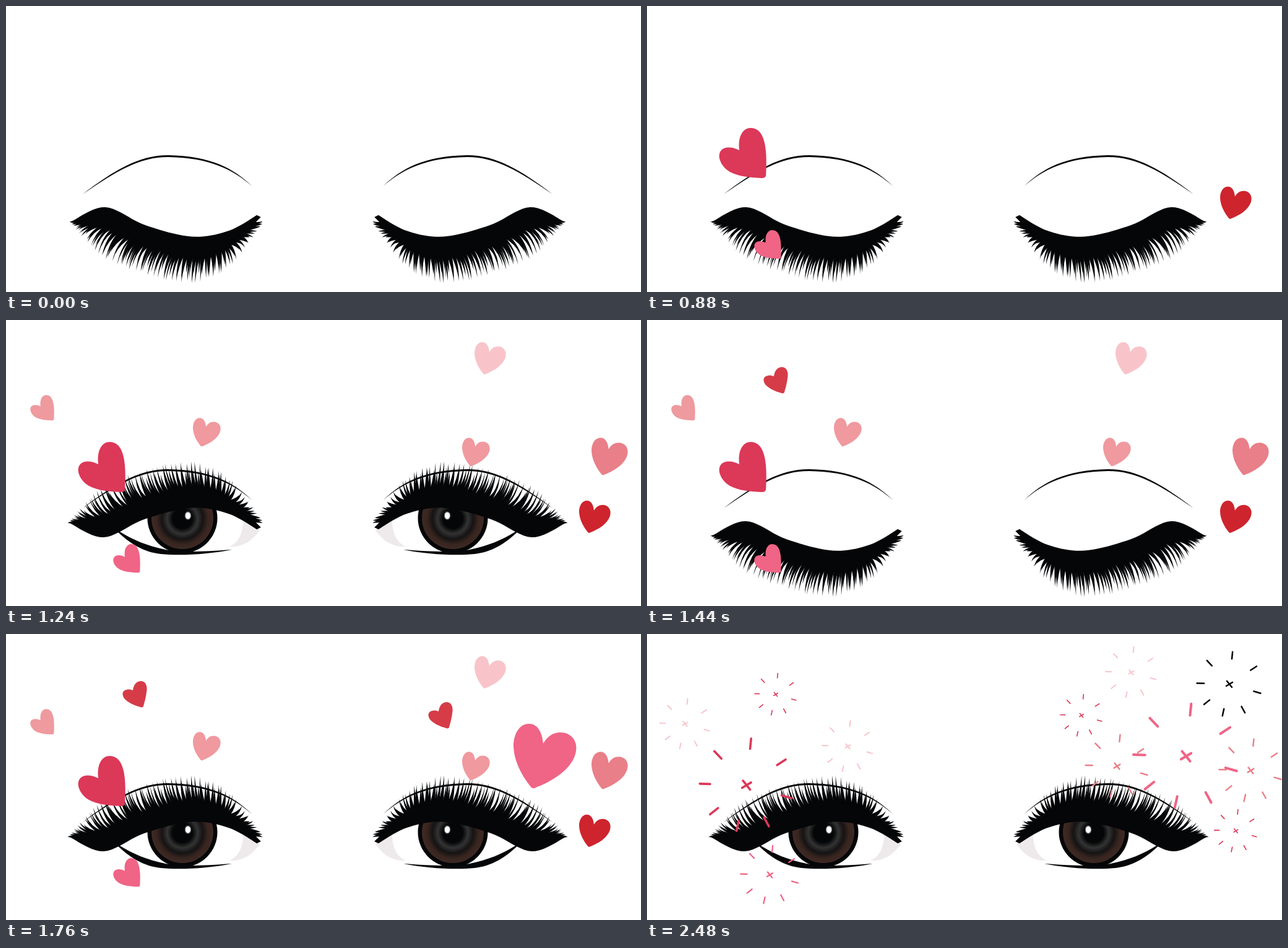
An HTML page with a canvas that plays this animation: 1026 by 462 pixels, repeating every 2.56 s.

```html
<!DOCTYPE html>
<html>
<head>
<meta charset="utf-8">
<style>
html, body { margin: 0; width: 100%; height: 100%; overflow: hidden; background: #fff; }
canvas { display: block; }
</style>
</head>
<body>
<canvas id="stage" width="1026" height="462"></canvas>
<script>
const ctx = document.getElementById('stage').getContext('2d');
const LOOP = 2560, STEP = 40;
const INK = '#050608', PINK = '#f06485', CRIMSON = '#dc3858', RED = '#d53c48',
  ROSE = '#f0999f', CORAL = '#e97f88', PALE = '#f8c4ca';

let seed = 11;
const rand = (a, b) => mix(a, b, (seed = seed * 16807 % 2147483647) / 2147483647);
const mix = (a, b, k) => a + (b - a) * k;
const mixPoint = (p, q, k) => p.map((v, i) => mix(v, q[i], k));

// Point at u (0..1) on a smooth curve through pts
function along(pts, u) {
  const n = pts.length - 1, i = Math.max(0, Math.min(n - 1, Math.floor(u * n))), k = u * n - i;
  const at = j => pts[Math.max(0, Math.min(n, j))];
  const [a, b, c, d] = [at(i - 1), at(i), at(i + 1), at(i + 2)];
  return [0, 1].map(m => b[m] + 0.5 * k * (c[m] - a[m] +
    k * (2 * a[m] - 5 * b[m] + 4 * c[m] - d[m] + k * (3 * (b[m] - c[m]) + d[m] - a[m]))));
}

// A closed lid: its upper edge, the reach of the lashes, and anything between
const edge = [[104, 349], [160, 325], [225, 354], [300, 372.5], [360, 363], [408, 336]];
const reach = [[103, 349], [150, 401], [215, 431], [287, 448], [357, 425], [417, 348]];
const between = (u, depth) => mixPoint(along(edge, u), along(reach, u), depth);

const lid = new Path2D();
for (let u = 0; u <= 1; u += 0.02) lid.lineTo(...between(u, 0));
for (let u = 1; u >= 0; u -= 0.02) lid.lineTo(...between(u, 0.42));

// Lashes lean away from the middle of the lid and hook at the tip
const LASHES = 96, MIDDLE = 0.62;
const lashes = Array.from({ length: LASHES }, (_, i) => {
  const u = i / (LASHES - 1);
  const [rx, ry] = between(mix(u, MIDDLE, 0.15), 0.38);
  const [tx, ty] = between(u + rand(-0.008, 0.008), i % 2 ? rand(0.78, 0.95) : rand(0.95, 1.01));
  const cx = mix(tx, rx, 0.27), cy = mix(ry, ty, 0.38);
  const d = Math.hypot(tx - rx, ty - ry), w = rand(1.8, 3.2);
  const nx = (ty - ry) / d * w, ny = (rx - tx) / d * w;
  const lash = new Path2D();
  lash.moveTo(rx + nx, ry + ny);
  lash.quadraticCurveTo(cx + nx * 0.6, cy + ny * 0.6, tx, ty);
  lash.quadraticCurveTo(cx - nx * 0.6, cy - ny * 0.6, rx - nx, ry - ny);
  return lash;
});

const crease = new Path2D('M124 304C175 265 215 241 262 241C330 242 368 262 398 291.5' +
  'C368 265 330 245 262 244C215 244 178 267 124 304Z');
const lowerLid = new Path2D('M178 340C200 361 222 375 250 378C280 381 325 379 365 371' +
  'C320 374 285 376 258 371C228 365 205 355 184 342Z');
const corner = new Path2D('M383 320C384 345 375 360 361 366C388 367 400 352 410 340C400 333 392 326 383 320Z');

const iris = ctx.createRadialGradient(285, 321, 16, 285, 321, 50);
['#050607', '#333', '#151313', '#38251f', '#3f2a24'].forEach((c, i) => iris.addColorStop(i / 4, c));

function disc(x, y, rx, ry, color) {
  ctx.beginPath();
  ctx.ellipse(x, y, rx, ry, 0, 0, 7);
  ctx.fillStyle = color;
  ctx.fill();
}

function drawEye(open) {
  if (open) {
    ctx.fillStyle = '#eee9eb';
    ctx.fill(corner);
    ctx.save();
    ctx.beginPath();
    ctx.rect(220, 298, 130, 90);
    ctx.clip();
    disc(285, 320, 56.5, 56.5, INK);
    disc(285, 320, 50, 50, iris);
    disc(294, 316, 5.5, 7, '#8888');
    disc(294, 316, 4.2, 5.5, '#fff');
    ctx.restore();
  }
  ctx.fillStyle = INK;
  if (open) ctx.fill(lowerLid);
  ctx.fill(crease);
  if (open) ctx.transform(1.01, 0, 0, -1, -4, 676);
  lashes.forEach(lash => ctx.fill(lash));
  ctx.fill(lid);
}

const heart = (w, h, focus, d) => ({ w, h, focus, path: new Path2D(d) });
const leaning = heart(77, 82, 0.08, 'M33 36C30 12 40 0 51 0C72 0 79 26 76 76Q76 81 69 81' +
  'C45 80 24 77 12 67C-2 54-3 38 8 33C16 30 25 32 33 36Z');
const small = heart(40, 43, 0, 'M17 15C18 5 24 0 30 0C38 0 41 9 39 18C38 28 35 36 34 41' +
  'Q32 43.5 29 42C18 39 8 34 3 28C-2 20 1 15 7 14C11 13 14 14 17 15Z');
const upright = heart(102, 105, 0, 'M48 32C46 12 38 0 25 0C10 0 0 16 0 36C1 62 14 84 28 102' +
  'Q31 106 36 103C62 93 90 76 99 52C107 30 94 14 76 14C62 14 54 22 48 32Z');

// start, shape, centre x, centre y, width, colour, burst scale, burst colour
const hearts = [
  [680, leaning, 195, 385.5, 44, PINK, 0.9],
  [800, leaning, 154.7, 238, 77, CRIMSON, 1.44],
  [880, upright, 951.5, 318, 51, '#ce242e', 0.66, CRIMSON],
  [920, leaning, 58.5, 142, 39, '#ee9a9f', 0.78, PALE],
  [1040, upright, 324.5, 181.5, 45, ROSE, 0.79, PALE],
  [1120, upright, 759.5, 213.5, 45, ROSE, 0.97, CORAL],
  [1160, upright, 975.5, 220.5, 59, CORAL, 0.97],
  [1240, upright, 782.5, 62, 51, PALE, 0.79],
  [1440, small, 208, 97.5, 40, RED, 0.65, CRIMSON],
  [1520, small, 702, 131.5, 40, RED, 0.65, CRIMSON],
  [1760, upright, 871, 197.5, 102, PINK, 1.62]
];

function drawHeart([, shape, x, y, width, color]) {
  const k = width / shape.w;
  ctx.save();
  ctx.translate(x, y);
  ctx.scale(k, k);
  ctx.translate(-shape.w / 2, -shape.h / 2);
  ctx.fillStyle = color;
  ctx.fill(shape.path);
  ctx.restore();
}

// A small cross inside eight slightly uneven rays
const rays = new Path2D('M-4-5L4 5M-5 3L5-3');
for (let i = 0; i < 8; i++) {
  const a = (45 * i - 81 + 8 * Math.sin(Math.PI * (i / 4 - 0.14))) * Math.PI / 180;
  rays.moveTo(41 * Math.cos(a), 41 * Math.sin(a));
  rays.lineTo(52.5 * Math.cos(a), 52.5 * Math.sin(a));
}

function drawBurst(x, y, scale, color) {
  ctx.save();
  ctx.translate(x, y);
  ctx.scale(scale, scale);
  ctx.lineCap = 'round';
  ctx.lineWidth = 2.5;
  ctx.strokeStyle = color;
  ctx.stroke(rays);
  ctx.restore();
}

const isOpen = t => t >= 1480 || [680, 920, 1240].includes(t);
const progress = (t, a, b) => Math.min(1, (t - a) / (b - a));

function draw(t) {
  ctx.fillStyle = '#fff';
  ctx.fillRect(0, 0, 1026, 462);
  for (const mirrored of [false, true]) {
    ctx.save();
    if (mirrored) ctx.transform(-1, 0, 0, 1, 1007, 0);
    drawEye(isOpen(t));
    ctx.restore();
  }
  if (t < 2320) hearts.filter(h => t >= h[0]).forEach(drawHeart);
  else {
    const grow = mix(0.2, 1, progress(t, 2320, 2480));
    for (const [, { focus }, x, y, w, color, scale, burstColor = color] of hearts)
      drawBurst(x + focus * w, y + focus * w, scale * grow, burstColor);
  }
  if (t >= 1880) drawBurst(941, 81, mix(0.15, 1, progress(t, 1880, 2480) ** 0.6), '#000');
}

const start = performance.now();
function tick() {
  const t = (performance.now() - start) % LOOP;
  draw(Math.floor(t / STEP) * STEP);
  requestAnimationFrame(tick);
}
tick();
</script>
</body>
</html>
```
